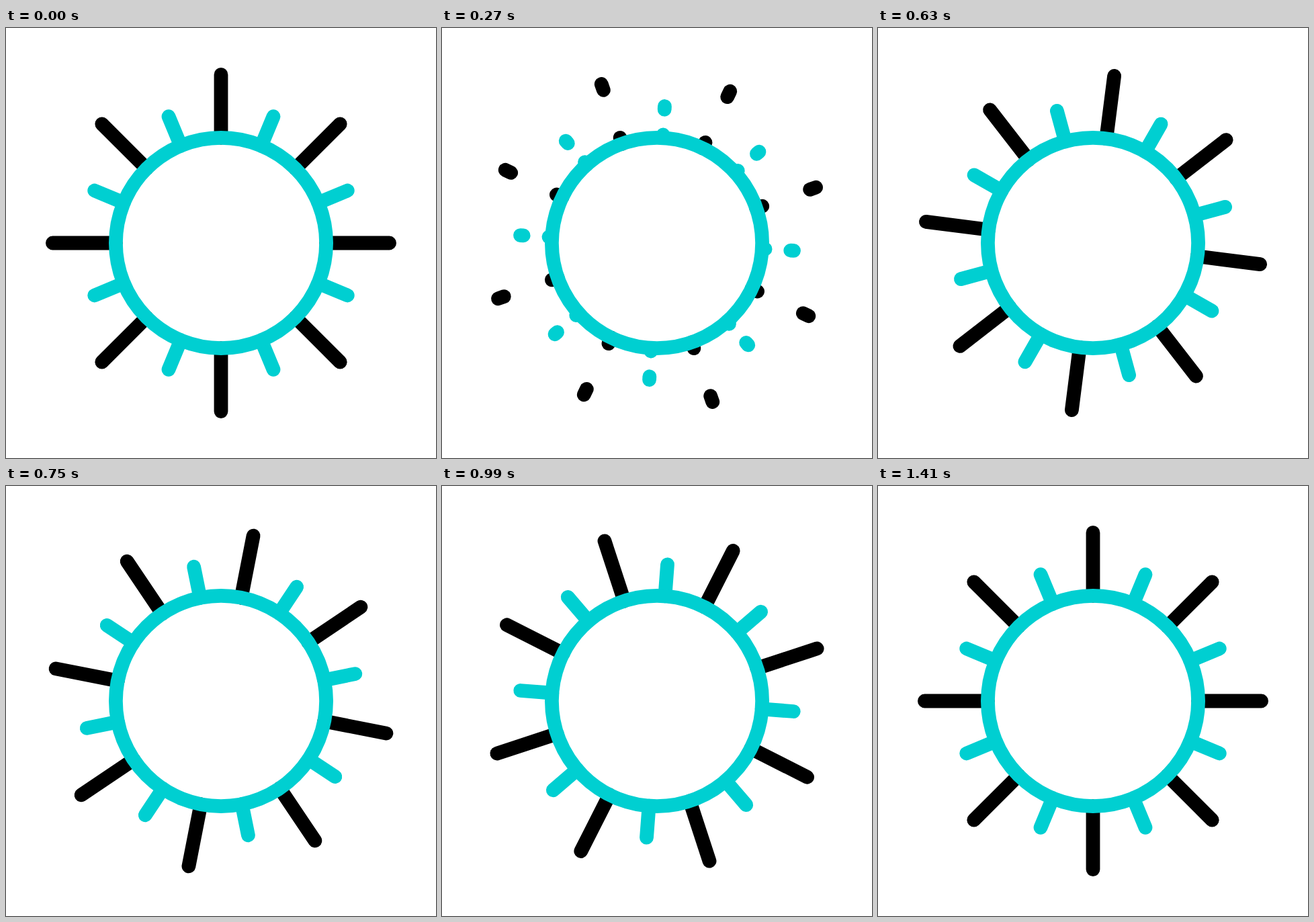
An HTML page that plays this animation: 640 by 640 pixels, repeating every 1510 ms.

```html
<!DOCTYPE html>
<html lang="en">
<head>
<meta charset="utf-8">
<title>Sun</title>
<style>
  html, body { margin: 0; width: 100%; height: 100%; overflow: hidden; background: #fff; }
  svg { display: block; width: 100vw; height: 100vh; }
  line, circle { fill: none; stroke-width: 20.8; stroke-linecap: round; }
</style>
</head>
<body>
<svg viewBox="0 0 640 640">
  <g transform="translate(320 320)">
    <g id="rays"></g>
    <circle r="156.6" stroke="#00cfd1"/>
  </g>
</svg>
<script>
const LOOP = 1510, STEP = 30, LAST = 47;
const TURN = 18;        // step at which the rays swing back
const SWING = -38.57;   // degrees
const INNER = 156.6;
const GAP = 80;         // percent of a ray's length

const rays = document.getElementById('rays');

function addRay(angle, tip, color) {
  const line = document.createElementNS('http://www.w3.org/2000/svg', 'line');
  const attrs = {
    x1: 0, y1: -INNER, x2: 0, y2: -tip,
    stroke: color, pathLength: 100, transform: `rotate(${angle})`
  };
  for (const key in attrs) line.setAttribute(key, attrs[key]);
  rays.append(line);
}

for (let i = 0; i < 8; i++) addRay(i * 45, 250.6, '#000');
for (let i = 0; i < 8; i++) addRay(i * 45 + 22.5, 203.8, '#00cfd1');

// cubic-bezier(.42, 0, .58, 1)
function ease(x) {
  let lo = 0, hi = 1;
  for (let i = 0; i < 30; i++) {
    const t = (lo + hi) / 2, u = 1 - t;
    if (3 * u * u * t * 0.42 + 3 * u * t * t * 0.58 + t * t * t < x) lo = t;
    else hi = t;
  }
  return lo * lo * (3 - 2 * lo);
}

function render(ms) {
  const n = Math.min(LAST, Math.floor((ms % LOOP) / STEP));
  const out = n < TURN;
  const p = ease(out ? n / TURN : (n - TURN) / (LAST - TURN));
  rays.setAttribute('transform', `rotate(${SWING * (out ? p : 1 - p)})`);

  // each ray shoots outward while the next one leaves the ring
  const moving = out && n > 0;
  rays.setAttribute('stroke-dasharray', moving ? `100 ${GAP}` : 'none');
  rays.setAttribute('stroke-dashoffset', moving ? -(100 + GAP) * p : 0);
}

const start = performance.now();
function tick() {
  render(performance.now() - start);
  requestAnimationFrame(tick);
}
tick();
</script>
</body>
</html>
```
